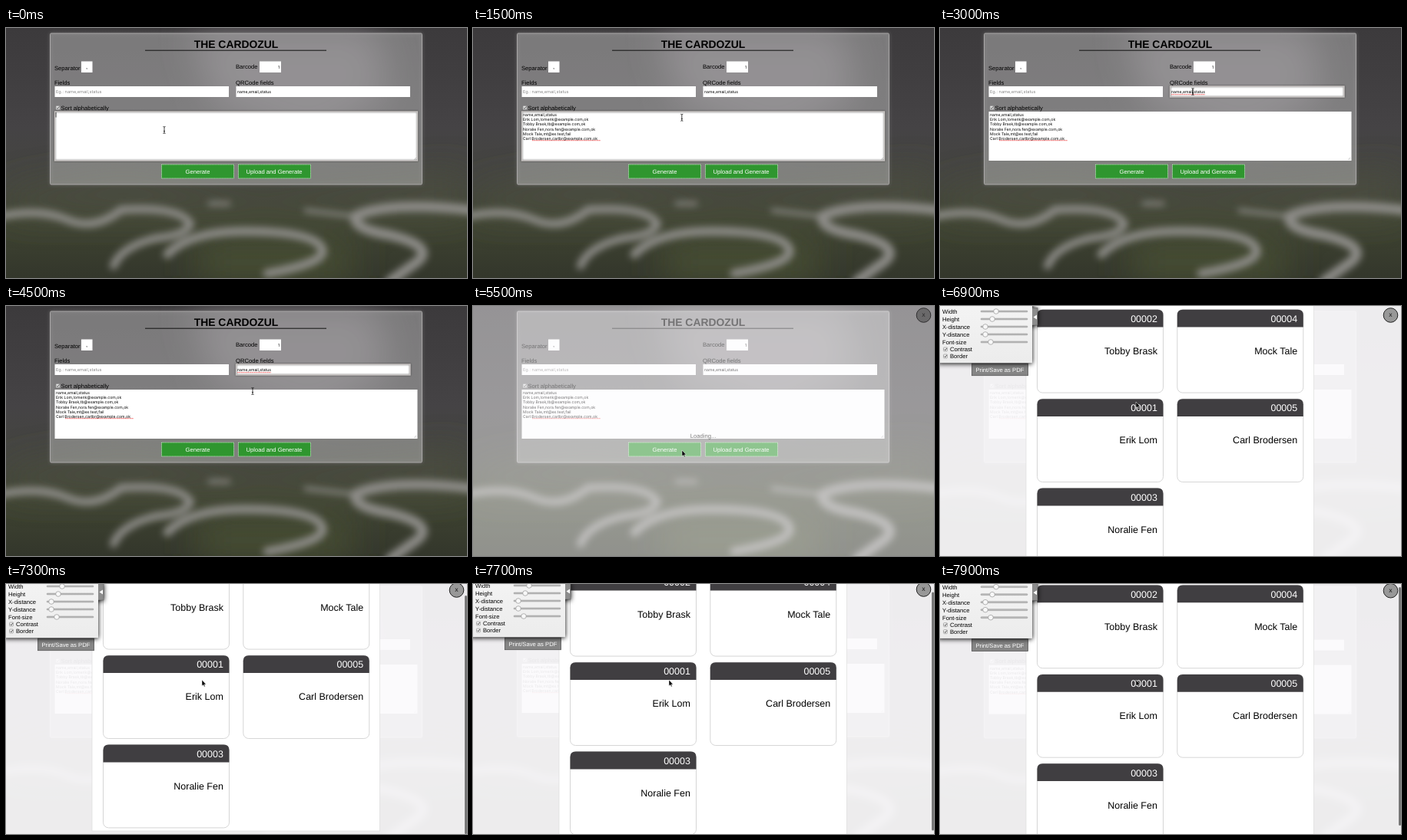
Animation of 600x326 px, one loop 8000 ms. Source, as an HTML page:

```html
<!DOCTYPE html>
<html lang="en">
<head>
<meta charset="utf-8">
<title>Card generator</title>
<style>
  html, body { margin: 0; width: 100%; height: 100%; overflow: hidden; background: #444; }
  svg { display: block; width: 100vw; height: 100vh; }
  text { font: 7.65px "Liberation Sans", Arial, sans-serif; text-rendering: geometricPrecision; white-space: pre; }
  .title { font-size: 13.9px; font-weight: bold; text-anchor: middle; }
  .mid { text-anchor: middle; }
  .small { font: 5.15px Inter, Roboto, sans-serif; }
  .hint { font-size: 5.6px; fill: #888; }
  .end { text-anchor: end; }
  .card text { font-size: 12.5px; text-anchor: end; }
  .light { fill: #fff; }
  .field { fill: #fff; }
  .button { fill: #2f962f; stroke: #a9dca9; stroke-dasharray: 1.4 .7; }
  .focus { fill: none; stroke: #c9c5c3; stroke-width: 1.4; filter: drop-shadow(0 0 1px #0009); }
  .spelling { stroke: #e33; stroke-width: .8; stroke-dasharray: 1.2 .5; }
  .road { fill: none; stroke: #8d8c88; stroke-linecap: round; stroke-linejoin: round; }
</style>
</head>
<body>
<svg viewBox="0 0 600 326" preserveAspectRatio="none">
  <defs>
    <linearGradient id="land" x2="0" y2="1">
      <stop offset="0" stop-color="#3c3a3c"/><stop offset=".4" stop-color="#454345"/>
      <stop offset=".62" stop-color="#44453f"/><stop offset=".75" stop-color="#414633"/>
      <stop offset="1" stop-color="#33362b"/>
    </linearGradient>
    <linearGradient id="metal" x2="0" y2="1">
      <stop offset="0" stop-color="#f4f4f4"/><stop offset="1" stop-color="#ececec"/>
    </linearGradient>
    <filter id="blur" x="-20%" y="-20%" width="140%" height="140%"><feGaussianBlur stdDeviation="5"/></filter>
    <filter id="haze" x="-50%" y="-50%" width="200%" height="200%"><feGaussianBlur stdDeviation="24"/></filter>
  </defs>

  <g id="landscape">
    <rect width="600" height="326" fill="url(#land)"/>
    <g filter="url(#haze)">
      <path d="M240 0H480L500 90 400 150 270 100Z" fill="#686468"/>
      <path d="M0 215L150 190 330 215 600 190V240H0Z" fill="#4b4d40"/>
      <path d="M250 285H450V326H250Z" fill="#4b5335"/>
    </g>
    <g class="road" filter="url(#blur)">
      <path stroke-width="10" d="M-5 245Q45 235 80 250T150 237Q225 232 240 255Q235 270 195 274Q150 285 140 310"/>
      <path stroke-width="11" d="M210 295Q240 265 310 265Q395 265 410 285T340 320"/>
      <path stroke-width="13" d="M610 238Q500 225 455 245Q450 262 500 270Q560 285 535 305L500 330"/>
      <path stroke-width="5" d="M265 229H290M390 238L450 245"/>
    </g>
  </g>

  <g id="form">
    <rect x="57.5" y="7" width="484" height="197" rx="1.5" fill="#fff" fill-opacity=".25" stroke="#aaa8a8" style="filter:drop-shadow(0 0 2px #888)"/>
    <text class="title" x="299.5" y="25.5">THE CARDOZUL</text>
    <path d="M181 29.2H417" stroke="#111"/>
    <text x="63" y="55">Separator</text>
    <rect class="field" x="98" y="43.5" width="14.5" height="14.5"/>
    <text x="104" y="53" font-weight="bold">,</text>
    <text x="299" y="53">Barcode</text>
    <rect class="field" x="330" y="43.5" width="28" height="14.5"/>
    <text class="small end" x="356" y="53">1</text>
    <text x="63" y="74">Fields</text>
    <rect class="field" x="63.5" y="76" width="226.5" height="14"/>
    <text class="small hint" x="65" y="85.2">Eg.: name,email,status</text>
    <text x="299" y="74">QRCode fields</text>
    <rect class="field" x="299.5" y="76" width="226.5" height="14"/>
    <rect x="65" y="101.5" width="5" height="5" rx="1" fill="#ddd" stroke="#888" stroke-width=".5"/>
    <path d="M66 104l1.3 1.4 2-3" fill="none" stroke="#444" stroke-width=".8"/>
    <text x="71.5" y="106.5">Sort alphabetically</text>
    <rect class="field" x="63.5" y="109" width="472" height="64"/>
    <path d="M531 172l3-3M533 172l1-1" stroke="#999" stroke-width=".5"/>
    <rect id="areaFocus" class="focus" x="63.5" y="109" width="472" height="64"/>
    <g id="qrFocus">
      <rect class="focus" x="299.5" y="76" width="226.5" height="14"/>
      <path class="spelling" d="M301 86.7H345"/>
    </g>
    <text class="small" x="301" y="85.2">name,email,status</text>
    <g id="list"></g>
    <path class="spelling" id="listSpelling" d="M77 146.7H166"/>
    <path id="caret" stroke="#000" stroke-width=".7"/>
    <rect class="button" x="202.5" y="178" width="94" height="18"/>
    <rect class="button" x="302.5" y="178" width="94" height="18"/>
    <text class="mid light" x="249.5" y="189.5">Generate</text>
    <text class="mid light" x="349" y="189.5">Upload and Generate</text>
  </g>

  <g id="modal">
    <rect width="600" height="326" fill="#fbfafc" opacity=".93"/>
    <text class="mid" id="loading" x="299.5" y="172">Loading...</text>
    <g id="sheet">
      <rect x="112" y="-2" width="374.5" height="352" fill="#fff" stroke="#ddd" stroke-width=".7"/>
      <g id="cards"></g>
    </g>
    <g id="chrome">
      <g id="settings">
        <rect x="41.5" y="75" width="73" height="15.7" fill="#858585" stroke="#555" stroke-width=".8"/>
        <text class="light" x="46.5" y="86.3">Print/Save as PDF</text>
        <g style="filter:drop-shadow(0 1px 3px #000)">
          <rect x="119" y="2.5" width="8" height="22.5" fill="#8c8c8c" stroke="#555" stroke-width=".5"/>
          <rect x="-3" y="-6" width="123" height="80.2" fill="url(#metal)"/>
        </g>
        <path d="M126 11.5v6l-4.5-3Z" fill="#fff"/>
        <g id="controls"></g>
      </g>
      <circle cx="586.5" cy="12" r="9.3" fill="#989898" stroke="#222"/>
      <text class="mid" x="586.5" y="14.4" style="font-size:6.5px">X</text>
    </g>
    <rect id="scrollbar" x="597" width="3" height="311" rx="1.5" fill="#777"/>
  </g>

  <g id="pointer">
    <path id="arrow" d="M0 0V8L1.8 6.4 3 9 4.2 8.5 3.1 5.9H5.4Z" stroke="#fff" stroke-width=".5"/>
    <path id="beam" d="M-1.5-4.5Q0-4.5 0-3.5Q0-4.5 1.5-4.5M0-3.5V3.5M-1.5 4.5Q0 4.5 0 3.5Q0 4.5 1.5 4.5M-1 1.5H1" fill="none" stroke="#111" stroke-width=".8"/>
  </g>
</svg>
<script>
const $ = id => document.getElementById(id);
const show = (id, visible) => $(id).style.display = visible ? "" : "none";
const shift = (id, x, y) => $(id).setAttribute("transform", `translate(${x} ${y})`);

const people = [
  ["Erik Lom", "lomerik@example.com", "ok"],
  ["Tobby Brask", "tb@example.com", "ok"],
  ["Noralie Fen", "nora.fen@example.com", "ok"],
  ["Mock Tale", "mt@ex.test", "fail"],
  ["Carl Brodersen", "carlbr@example.com", "ok"]
];

$("list").innerHTML = ["name,email,status", ...people.map(p => p.join())]
  .map((line, i) => `<text class="small" x="65" y="${115 + i * 6.2}">${line}</text>`).join("");

// Two cards per row.
$("cards").innerHTML = [2, 4, 1, 5, 3].map((number, i) => `
  <g class="card" transform="translate(${126.5 + i % 2 * 182.3} ${4.8 + (i >> 1) * 116.4})">
    <rect width="164" height="108.3" rx="7" fill="#fff" stroke="#ccc" stroke-width=".8"/>
    <path d="M0 22.8V7Q0 0 7 0H157Q164 0 164 7V22.8Z" fill="#403e41"/>
    <text class="light" x="156.4" y="16.3">0000${number}</text>
    <text x="156.4" y="58.3">${people[number - 1][0]}</text>
  </g>`).join("");

const sliders = [["Width", 73], ["Height", 68], ["X-distance", 59], ["Y-distance", 59], ["Font-size", 66]];
$("controls").innerHTML = sliders.map(([label, x], i) => {
  const y = 7 + i * 10;
  return `<text x="3" y="${y + 3}">${label}</text>
    <rect x="53" y="${y - 1}" width="61" height="2" rx="1" fill="#bbb" stroke="#888" stroke-width=".4"/>
    <circle cx="${x}" cy="${y}" r="3.3" fill="#f8f8f8" stroke="#888" stroke-width=".6"/>`;
}).join("") + ["Contrast", "Border"].map((label, i) => {
  const y = 56.5 + i * 9;
  return `<rect x="4.5" y="${y - 2.5}" width="5" height="5" rx="1" fill="#eee" stroke="#777" stroke-width=".5"/>
    <path d="M5.5 ${y}l1.3 1.4 2-3" fill="none" stroke="#333" stroke-width=".8"/>
    <text x="13" y="${y + 2.5}">${label}</text>`;
}).join("");

// Keyframes: time, then x and y.
const pointerPath = [
  [1000, 206, 133], [2200, 381, 90], [2700, 329, 83], [3000, 329, 83], [3600, 331, 58],
  [3800, 331, 58], [4500, 321, 111], [4600, 321, 111], [5400, 272, 188], [6400, 272, 188], [6900, 255, 125]
];
// Time, sheet scroll, page scroll: the sheet reaches its end before the page follows.
const scrollPath = [
  [7100, 0, 0], [7200, 17, 0], [7300, 24, 4], [7400, 24, 5],
  [7600, 24, 5], [7700, 14, 5], [7800, 3, 5], [7900, 0, 3.3]
];
const linear = u => u;
const smooth = u => u * u * (3 - 2 * u);

function at(keys, time, ease) {
  const next = keys.findIndex(key => key[0] > time);
  if (next < 0) return keys[keys.length - 1].slice(1);
  if (next === 0) return keys[0].slice(1);
  const [from, to] = [keys[next - 1], keys[next]];
  const u = ease((time - from[0]) / (to[0] - from[0]));
  return from.slice(1).map((v, i) => v + (to[i + 1] - v) * u);
}

const LOOP = 8000, STEP = 100;
const PASTED = 500, CHECKED = 1000, QR_CLICK = 2900, SUBMIT = 5500, READY = 6000, SCROLL = 7200;

function draw(time) {
  const [x, y] = at(pointerPath, time, smooth);
  const [sheetScroll, pageScroll] = at(scrollPath, time, linear);
  const inQr = time >= QR_CLICK, open = time >= SUBMIT, ready = time >= READY;

  show("list", time >= PASTED);
  show("listSpelling", time >= CHECKED);
  show("areaFocus", !inQr);
  show("qrFocus", inQr && !open);
  const blinkStart = inQr ? QR_CLICK : 0;
  show("caret", !open && (time - blinkStart) % 1000 < 500);
  $("caret").setAttribute("d", inQr ? "M329 79.5v7" : time >= PASTED ? "M167.5 140.5v6.5" : "M65 110v6.5");

  show("modal", open);
  $("modal").setAttribute("opacity", time < SUBMIT + STEP ? .5 : 1);
  show("loading", !ready);
  show("sheet", ready);
  show("settings", ready);
  show("scrollbar", time >= SCROLL);
  $("scrollbar").setAttribute("y", 4 + sheetScroll * .46);
  shift("form", 0, -pageScroll);
  shift("chrome", 0, -pageScroll);
  shift("sheet", 0, -sheetScroll - pageScroll);

  const arrow = open || y > 173 || y < 75;
  show("arrow", arrow);
  show("beam", !arrow);
  shift("pointer", x, y);
}

const start = performance.now();
function tick() {
  const time = (performance.now() - start) % LOOP;
  draw(Math.floor(time / STEP) * STEP);
  requestAnimationFrame(tick);
}
tick();
</script>
</body>
</html>
```
